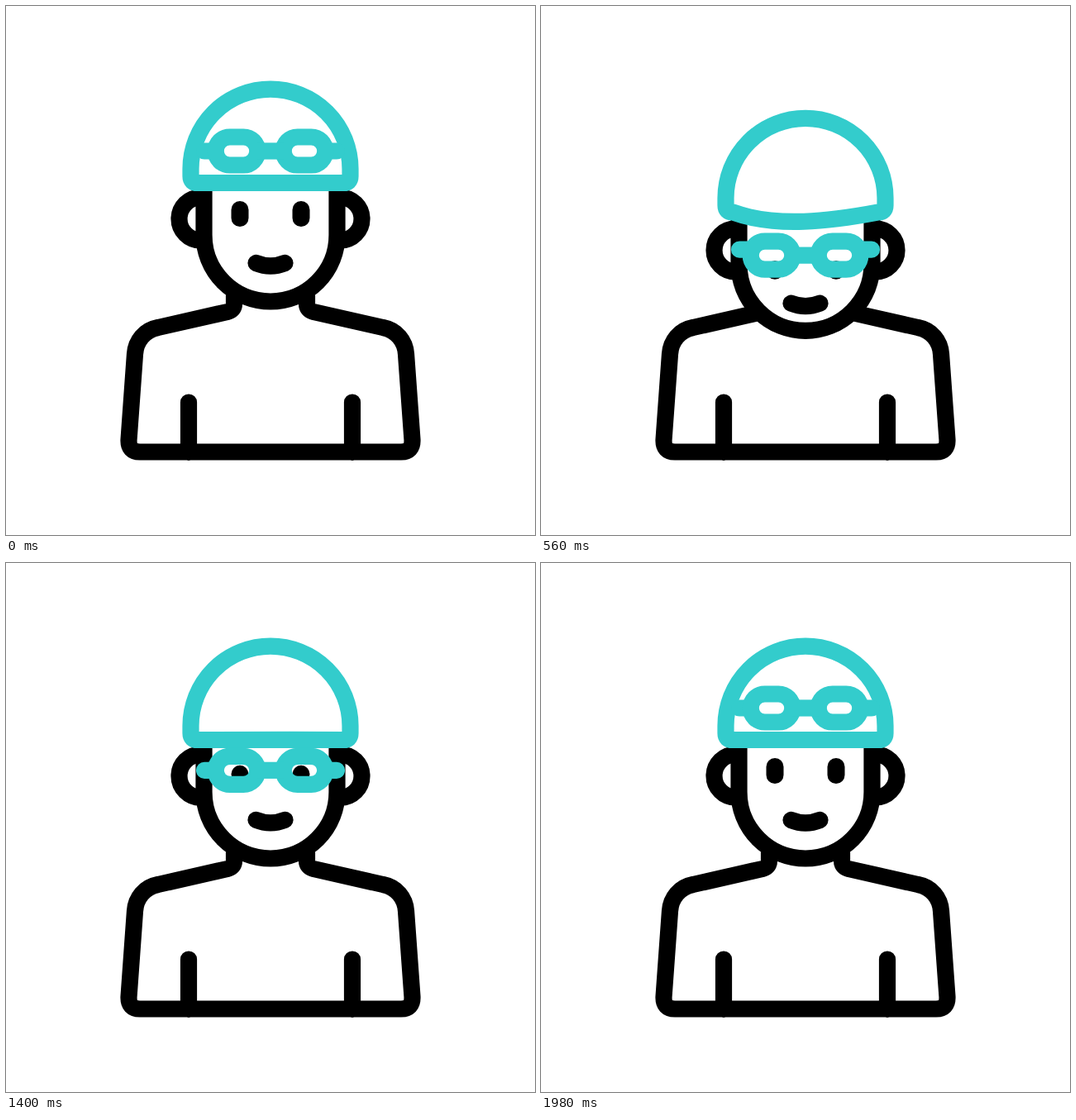
An HTML page that plays this animation: 640 by 640 pixels, repeating every 2400 ms.

```html
<!DOCTYPE html>
<html lang="en">
<head>
<meta charset="utf-8">
<title>Swimmer</title>
<style>
html, body { margin: 0; width: 100%; height: 100%; overflow: hidden; background: #fff; }
svg { display: block; width: 100%; height: 100%; }
</style>
</head>
<body>
<svg viewBox="0 0 640 640" fill="none" stroke="#000" stroke-width="20.2" stroke-linecap="round" stroke-linejoin="round">
  <path d="M276 350V360Q276 368 268 370L184 389C168 392 157 405 156 421L148.5 525Q148 539.5 162 539.5H478Q492 539.5 491.5 525L484 421C483 405 472 392 456 389L372 370Q364 368 364 360V350M221 479.5V540M419 479.5V540"/>
  <path id="ears" d="M238 231.5H235.5A26 26 0 0 0 235.5 283.5H238M402 231.5H404.5A26 26 0 0 1 404.5 283.5H401"/>
  <path id="face" fill="#fff" stroke-linecap="butt" d="M239.5 205V277A80.5 80.5 0 0 0 400.5 277V205"/>
  <path id="eyes" stroke-width="21"/>
  <path id="mouth" d="M302.5 311Q320 318 337.5 311"/>
  <g stroke="#3cc">
    <path id="cap" fill="#fff"/>
    <path id="strap" d="M240 175.5H250M390 175.5H400"/>
    <g id="lenses">
      <rect x="253.75" y="158.5" width="50.5" height="34" rx="17"/>
      <rect x="335.75" y="158.5" width="50.5" height="34" rx="17"/>
      <path stroke-linecap="butt" d="M304 175.5H336"/>
    </g>
  </g>
</svg>
<script>
const LOOP = 2400, STEP = 20;
const el = id => document.getElementById(id);
const move = (id, y) => el(id).setAttribute("transform", `translate(0 ${y})`);

function capPath(bend) {
  // a drooping brim hangs lower on the left
  const skew = Math.max(0, bend) * 0.37;
  const left = 214 + bend * 1.333 + skew;
  const right = 214 + bend * 1.333 - skew;
  return `M223.5 206V197A96.5 96.5 0 0 1 416.5 197V206Q416.5 214 408.5 214` +
    `C350 ${right} 285 ${left} 231.5 214Q223.5 214 223.5 206Z`;
}

function draw(now) {
  const t = Math.floor(now % LOOP / STEP) * STEP;
  const linear = (from, to) => Math.min(1, Math.max(0, (t - from) / (to - from)));
  const ramp = (from, to) => (1 - Math.cos(Math.PI * linear(from, to))) / 2;

  // look up, nod the goggles down, straighten; later look up and put them back
  const drop = ramp(367, 628), raise = ramp(1385, 1667);
  const tilt = ramp(0, 367) - drop + raise - ramp(1667, 1980);
  const nod = drop - ramp(628, 933);
  const worn = drop - raise;

  // lenses and eyes run ahead while the goggles drop
  const x = linear(367, 628);
  const lead = 36 * x * (1 - x);
  const goggles = 76 * worn + 69.5 * nod - 20.5 * tilt;
  const head = 42 * nod;

  move("face", head);
  move("cap", head);
  move("ears", 41 * nod + 21.5 * tilt);
  move("mouth", 62 * nod - 22 * tilt);
  move("strap", goggles);
  move("lenses", goggles + lead);
  el("cap").setAttribute("d", capPath(16 * nod - 13 * tilt));

  const eyeY = 251.5 + 4 * worn + 72 * nod - 18 * tilt + lead;
  const half = 5 * (1 - worn) + 0.01;
  el("eyes").setAttribute("d", [283, 357].map(cx => `M${cx} ${eyeY - half}V${eyeY + half}`).join(""));
}

const start = performance.now();
function tick() {
  draw(performance.now() - start);
  requestAnimationFrame(tick);
}
tick();
</script>
</body>
</html>
```
